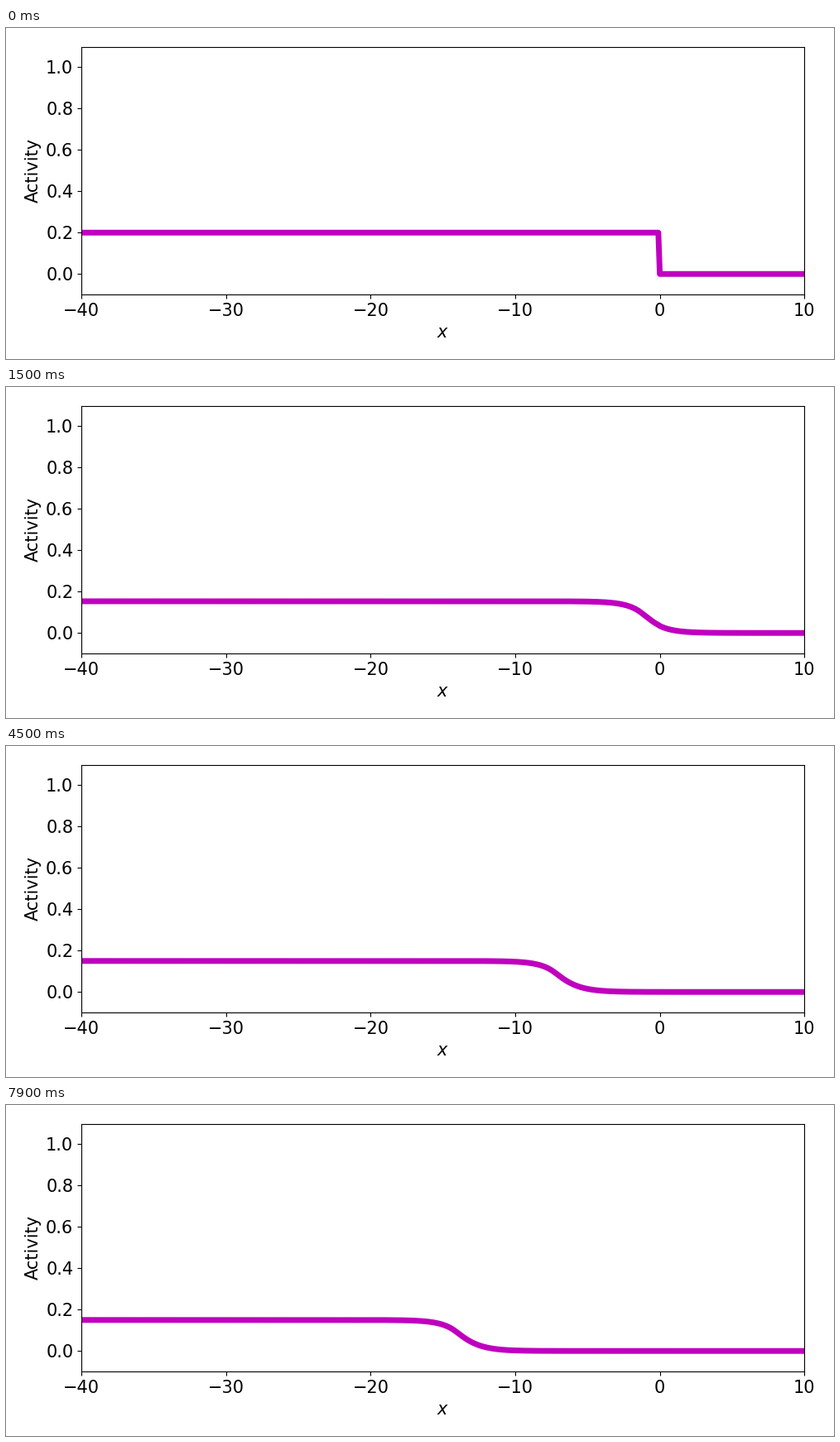
A matplotlib script that plays this animation: 1000x400 px, repeating every 8 s.

```python
import numpy as np
import matplotlib.pyplot as plt
from matplotlib.animation import FuncAnimation

FRAMES, INTERVAL = 80, 100
SUBSTEPS = 20
STEP = 0.33          # model time per frame
START = 0.2          # height of the initial step
REST = 0.15          # settled plateau
DECAY = 0.18         # plateau relaxation per frame
SPEED = 0.2012       # front speed per frame
ONSET, SOFTNESS = 8.0, 1.5

x = np.arange(-400, 101) / 10


def edge(n):
    """Position of the retreating front, at rest before the onset."""
    return -SPEED * SOFTNESS * np.logaddexp(0, (n - ONSET) / SOFTNESS)


def drive(n):
    """Input from the active half-line through an exponential kernel."""
    gap = x - edge(n)
    tail = 0.5 * np.exp(-np.abs(gap))
    gain = REST + (START - REST) * (1 - DECAY / STEP) * np.exp(-DECAY * n)
    return gain * np.where(gap > 0, tail, 1 - tail)


def simulate():
    u = np.where(x < 0, START, 0.0)
    keep = np.exp(-STEP / SUBSTEPS)
    states = [u]
    for n in range(FRAMES - 1):
        for k in range(SUBSTEPS):
            target = drive(n + (k + 0.5) / SUBSTEPS)
            u = target + (u - target) * keep
        states.append(u)
    return states


states = simulate()

plt.rcParams["font.family"] = "DejaVu Sans"
plt.rcParams["font.size"] = 15
fig, ax = plt.subplots(figsize=(10, 4), dpi=100)
line, = ax.plot(x, states[0], color="m", lw=5)
ax.set_xlim(-40, 10)
ax.set_ylim(-0.1, 1.1)
ax.set_xlabel("$x$")
ax.set_ylabel("Activity")
fig.tight_layout()


def draw(n):
    line.set_ydata(states[n])
    return line,


anim = FuncAnimation(fig, draw, frames=FRAMES, interval=INTERVAL,
                     init_func=lambda: draw(0), repeat=True)
plt.show()
```
